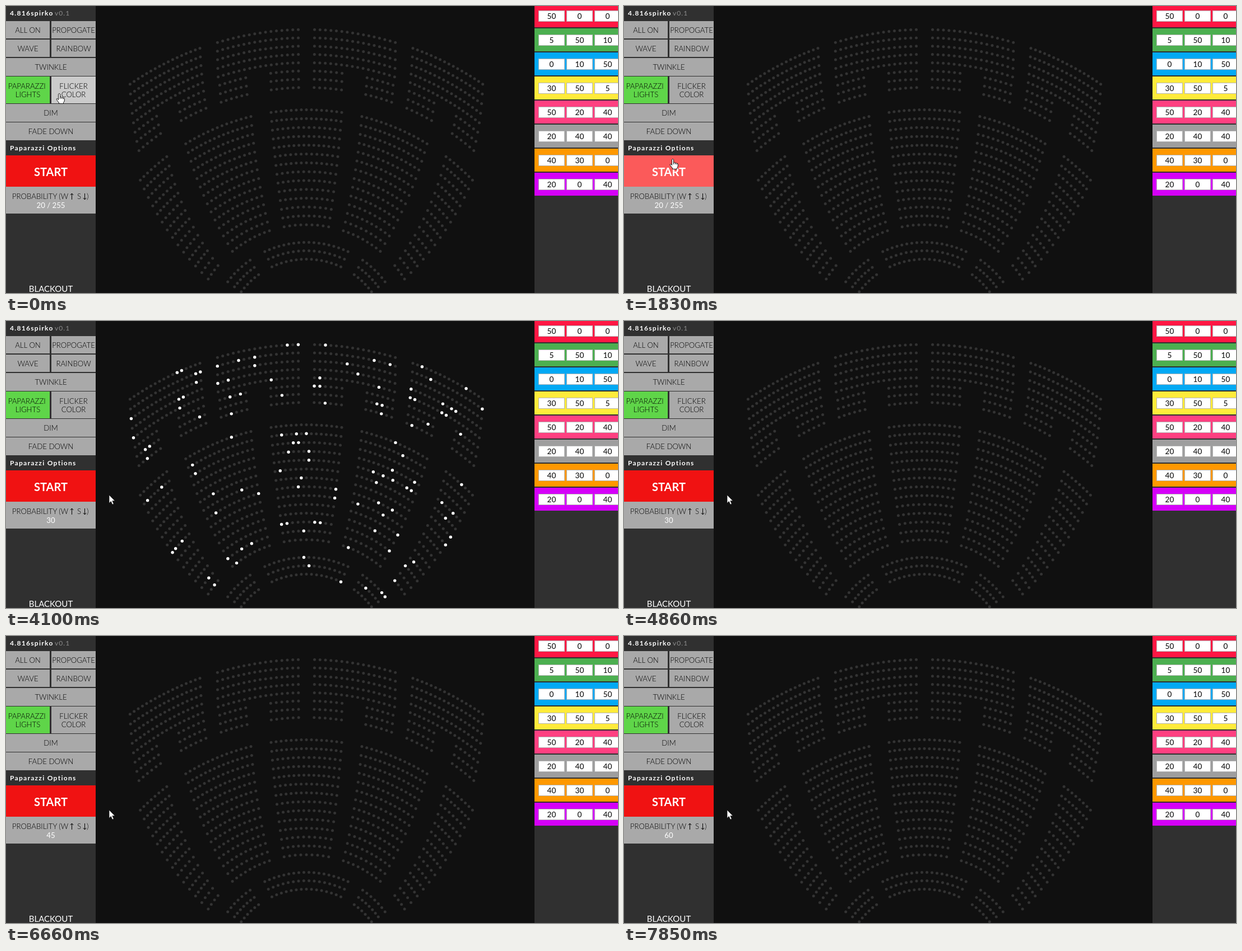
Recreate the animation shown at these times as an HTML page with a canvas. Size 1092 by 513 pixels, loop 8000 ms.

```html
<!DOCTYPE html>
<html lang="en">
<head>
<meta charset="utf-8">
<title>Seat lights</title>
<style>
  html, body { margin: 0; width: 100%; height: 100%; overflow: hidden; background: #101010; }
  body { position: relative; font: 300 13.2px/15.5px "Lato Light", Lato, "Open Sans", sans-serif; color: #000; }
  #stage { position: absolute; left: 0; top: 0; width: 1092px; height: 513px; overflow: hidden; }
  #stage > * { position: absolute; }
  canvas { left: 0; top: 0; }
  .side { top: 0; height: 513px; background: #303030; }
  .box { box-sizing: border-box; padding-top: 2px; display: flex; align-items: center;
         justify-content: center; text-align: center; white-space: pre; background: #a9a9a9; }
  .box.hover { background: #cbcbcb; }
  .box.on { background: #5fd549; }
  .box.start { background: #f01212; padding-top: 4px; }
  .box.start.hover { background: #fb5a5a; }
  .text { white-space: pre; }
  .start, .head, .ver, .big, .count, .field { font-family: Lato, "Open Sans", sans-serif; font-weight: 400; }
  .start, .head, .big, .count { color: #fff; }
  .start, .head { font-weight: 700; }
  .start { font-size: 20px; }
  .head { font-size: 12px; letter-spacing: 1.3px; }
  .ver { color: #8c8c8c; font-size: 12px; letter-spacing: 1.1px; }
  .big { font-size: 15px; text-align: center; }
  .count { text-align: center; }
  .field { box-sizing: border-box; background: #fff; border: 1px solid #b5b5b5;
           text-align: center; font-size: 13.6px; line-height: 18px; }
  svg { overflow: visible; }
</style>
</head>
<body>
<div id="stage">
  <canvas id="seats" width="1092" height="513"></canvas>
  <div class="side" style="left:0;width:160px"></div>
  <div class="side" style="left:943px;width:149px"></div>
</div>
<script>
const LOOP = 8000;
const stage = document.getElementById('stage');
const ctx = document.getElementById('seats').getContext('2d');
const mix = (a, b, t) => a + (b - a) * t;
const clamp = (v, lo, hi) => Math.min(hi, Math.max(lo, v));

function add(cls, x, y, text, w, h) {
  const el = document.createElement('div');
  el.className = cls;
  el.textContent = text;
  el.style.left = x + 'px';
  el.style.top = y + 'px';
  if (w) el.style.width = w + 'px';
  if (h) el.style.height = h + 'px';
  stage.append(el);
  return el;
}

function addSvg(markup) {
  const el = document.createElementNS('http://www.w3.org/2000/svg', 'svg');
  el.setAttribute('width', 1);
  el.setAttribute('height', 1);
  el.style.left = el.style.top = 0;
  el.innerHTML = markup;
  stage.append(el);
  return el;
}

// Left panel: each row of buttons shares the panel width
const buttons = [];

function buttonRow(y, h, labels, cls = '') {
  labels.forEach((label, i) => {
    const x = 81 * i, w = labels.length === 1 ? 160 : i ? 79 : 78;
    buttons.push({ el: add('box ' + (i ? '' : cls), x, y, label, w, h), x, y, w, h });
  });
}

add('text head', 7, 5, '4.816spirko');
add('text ver', 87, 5, 'v0.1');
buttonRow(27, 31, ['ALL ON', 'PROPOGATE']);
buttonRow(60, 31, ['WAVE', 'RAINBOW']);
buttonRow(93, 32, ['TWINKLE']);
buttonRow(126, 48, ['PAPARAZZI \nLIGHTS', 'FLICKER\nCOLOR'], 'on');
buttonRow(175, 32, ['DIM']);
buttonRow(208, 32, ['FADE DOWN']);
add('text head', 7, 246, 'Paparazzi Options');
buttonRow(267, 56, ['START'], 'start');

add('box', 0, 323, '', 160, 48);
add('text', 11, 333, 'PROBABILITY (W');
add('text', 127, 333, 'S');
add('text', 144, 333, ')');
addSvg(`<g fill="none" stroke="#000">
  <path d="M117.5 346V335M114.8 338l2.7-3 2.7 3"/>
  <path d="M140.5 335V346M137.8 343l2.7 3 2.7-3"/></g>`);
const count = add('text count', 0, 349, '', 160);
add('text big', 0, 498, 'BLACKOUT', 160);

// Right panel
[
  ['#ff1744', 50, 0, 0], ['#4caf50', 5, 50, 10],
  ['#03a9f4', 0, 10, 50], ['#ffeb3b', 30, 50, 5],
  ['#ff4081', 50, 20, 40], ['#9e9e9e', 20, 40, 40],
  ['#ff9800', 40, 30, 0], ['#d500f9', 20, 0, 40]
].forEach(([color, ...rgb], i) => {
  const y = 43 * i;
  add('', 943, y - 3, '', 149, 41).style.background = color;
  rgb.forEach((v, k) => add('field', 950 + 50 * k, y + 8, v, 47, 20));
});

// Seats lie on concentric arcs; section edges fan out row by row
const CX = 536, CY = 597.5;
const seats = [];

function tier(radius, step, innerFan, outerFan, gapGrowth) {
  return (first, last, from, to, gap) => {
    const sides = from < 0 ? [1] : [-1, 1];
    for (let i = first; i <= last; i++) {
      const r = radius - step * i;
      const a = from * (1 + i * (from < 0 ? outerFan : innerFan)) * Math.PI / 180;
      const b = to * (1 + i * outerFan) * Math.PI / 180;
      const n = Math.round(r * (b - a) / (gap + gapGrowth * i));
      for (const side of sides)
        for (let k = 0; k <= n; k++) {
          const ang = side * mix(a, b, k / n);
          seats.push([CX + r * Math.sin(ang), CY - r * Math.cos(ang)]);
        }
    }
  };
}

const balcony = tier(555.5, 14.8, 0.024, 0.0285, 0);
balcony(0, 4, 1.5, 16.6, 9.6);
balcony(0, 4, 20, 34.5, 9);
balcony(5, 7, 1.5, 6.65, 9.5);
balcony(5, 7, 11.6, 16.4, 9.5);
balcony(5, 7, 20, 24.7, 9.2);
balcony(5, 7, 30.1, 34.5, 9.2);

const floor = tier(412, 15.8, 0.026, 0.02, 0.073);
floor(0, 13, -8.8, 8.8, 8.95);
floor(0, 13, 13.9, 31.5, 8.95);
floor(0, 13, 37.2, 46, 9);

const front = tier(175, 15, 0.015, 0, 0);
front(0, 2, -25.1, 25.1, 9.2);
front(0, 2, 35, 53.3, 8.8);

// Each cycle is dark first, then lit with a fresh random set
const BEGIN = 1954, CYCLE = 392, DARK = 165;

const presses = (t, start, n) => clamp(Math.floor((t - start) / 250) + 1, 0, n);
const levelAt = t => 20 + 5 * (presses(t, 3420, 2) + presses(t, 5850, 3) + presses(t, 6860, 3));

function noise(i, k) {
  const v = Math.sin(i * 12.9898 + k * 78.233) * 43758.5453;
  return v - Math.floor(v);
}

function drawSeats(cycle, chance) {
  ctx.fillStyle = '#101010';
  ctx.fillRect(0, 0, 1092, 513);
  seats.forEach(([x, y], i) => {
    const on = noise(i, cycle) < chance;
    ctx.fillStyle = on ? '#fff' : '#333';
    ctx.beginPath();
    ctx.arc(x, y, on ? 2.7 : 2.5, 0, 2 * Math.PI);
    ctx.fill();
  });
}

// Pointer stops: time, x, y
const stops = [[0, 95, 156], [120, 95, 156], [620, 95, 194], [900, 95, 194],
  [1250, 259, 164], [1780, 87, 272], [1940, 86, 278], [2150, 184, 311], [LOOP, 184, 311]];

const pointer = addSvg(`
  <g id="hand" fill="#fff" stroke="#111" stroke-linejoin="round">
    <path d="M-1.5 1.5Q0 -.8 1.5 1.5V7Q3.5 5.8 4.4 7.5Q6.2 6.6 7 8.4Q9.2 7.8 9.3 10
      V13Q9 15.5 7.5 16.5V18.5H-.5V17Q-2.5 14.5 -4.6 11.5Q-5.4 9.5 -3.5 9.5L-1.5 11.5Z"/>
    <path d="M1.5 7V10M4.4 7.5V10M7 8.4V10.5" fill="none"/>
  </g>
  <path id="arrow" d="M0 0V14.5L3.3 11.4L5.7 17L8.2 16L5.8 10.5H10.3Z"
    fill="#fff" stroke="#111" stroke-width=".7"/>`);
const hand = pointer.querySelector('#hand');
const arrow = pointer.querySelector('#arrow');

function pointerAt(t) {
  const i = stops.findIndex(s => s[0] > t);
  const [t0, x0, y0] = stops[i - 1], [t1, x1, y1] = stops[i];
  const u = (t - t0) / (t1 - t0), e = u * u * (3 - 2 * u);
  return [mix(x0, x1, e), mix(y0, y1, e)];
}

let shown = '';

function frame(now) {
  const t = now % LOOP;
  const cycle = Math.floor((t - BEGIN) / CYCLE);
  const lit = cycle >= 0 && t - BEGIN - cycle * CYCLE >= DARK;
  const chance = lit ? levelAt(BEGIN + cycle * CYCLE + DARK) / 255 : 0;
  const state = cycle + ':' + chance;
  if (state !== shown) {
    drawSeats(cycle, chance);
    shown = state;
  }
  count.textContent = levelAt(t) + (t < BEGIN + DARK ? ' / 255' : '');

  const [x, y] = pointerAt(t);
  let over = false;
  for (const b of buttons) {
    const hit = x >= b.x && x < b.x + b.w && y >= b.y && y < b.y + b.h;
    b.el.classList.toggle('hover', hit);
    over = over || hit;
  }
  pointer.style.transform = `translate(${Math.round(x)}px, ${Math.round(y)}px)`;
  hand.style.display = over ? '' : 'none';
  arrow.style.display = over ? 'none' : '';
  requestAnimationFrame(frame);
}

requestAnimationFrame(frame);
</script>
</body>
</html>
```
